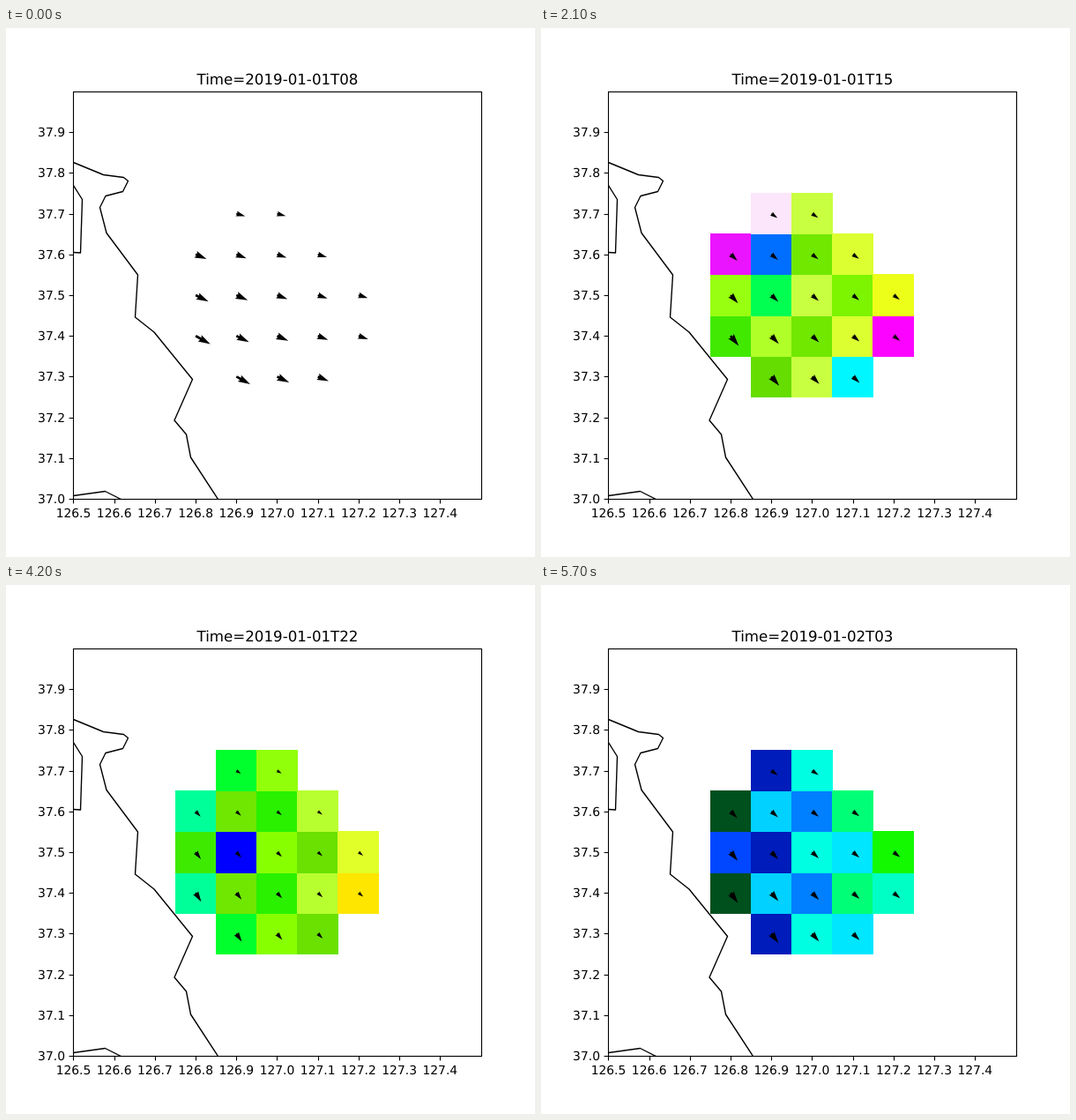
Recreate the animation shown at these times as an HTML page with a canvas. Size 600 px wide and 600 px high, loop 6 s.

```html
<!DOCTYPE html>
<html lang="en">
<head>
<meta charset="utf-8">
<title>Hourly wind map</title>
<style>
  html, body { margin: 0; width: 100%; height: 100%; overflow: hidden; background: #fff; }
  canvas { display: block; width: 100vw; height: 100vh; }
</style>
</head>
<body>
<canvas id="map" width="600" height="600"></canvas>
<script>
const ctx = document.getElementById('map').getContext('2d');
const STEP_MS = 300, STEPS = 20, FIRST_CELL_STEP = 2;
const DEGREE = 462, CELL = DEGREE / 10, LEFT = 76.5, BOTTOM = 534;

const coast = [
  [[76, 152], [110, 166], [133, 169], [138, 173], [132, 185], [112.5, 190], [106, 203], [113.5, 232],
   [149, 279.5], [146, 327.5], [167.5, 344.5], [211, 398], [190.5, 444.5], [204, 460.5], [209, 486.5], [240, 534]],
  [[76, 178], [86, 194], [84, 254.5], [76, 254]],
  [[76, 530], [112, 525], [130, 534]]
];

// First and last occupied column of each row, north to south; drawn from the south
const rowSpans = [[1, 2], [0, 3], [0, 4], [0, 4], [1, 3]];
const cells = rowSpans.flatMap(([from, to], row) =>
  Array.from({ length: to - from + 1 }, (_, i) => ({ row, col: from + i })))
  .sort((a, b) => b.row - a.row || a.col - b.col);

// Evenly spaced colour stops, ten value units apart
const palette = ['008', '060', '00f', '0bf', '0ff', '0f9', '0f0', '6d0', '8f0', 'cf4',
                 'ff0', 'fd0', 'fb1', 'f91', 'f40', 'f00', 'f0f', 'a5f', 'e8e', 'fff']
  .map(hex => [...hex].map(digit => parseInt(digit, 16) * 17));

// Places that stand out from the general level for a while
const spots = [
  { col: 1, row: 0, peak: 7.5, spread: 4.8, amount: 118 },
  { col: 1, row: 1, peak: 7.5, spread: 5, amount: -60 },
  { col: 4, row: 3, peak: 8, spread: 6, amount: 80 },
  { col: 0, row: 1, peak: 7.5, spread: 3.5, amount: 96 },
  { col: 2, row: 0, peak: 11, spread: 2.5, amount: 94 },
  { col: 2, row: 3, peak: 11, spread: 2, amount: 100 },
  { col: 1, row: 2, peak: 11, spread: 4, amount: -41 },
  { col: 3, row: 4, peak: 6, spread: 4, amount: -38 }
];

const snap = v => Math.round(v - 0.01) + 0.5;
const lonX = lon => LEFT + (lon - 126.5) * DEGREE;
const latY = lat => BOTTOM - (lat - 37) * DEGREE;
const wave = (step, peak, period) => Math.cos(2 * Math.PI * (step - peak) / period);

// Rises until step 9, then falls; a growing slope to the east and a checkered ripple
function cellValue({ row, col }, step) {
  const level = 82 - 0.51 * (step - 9) ** 2;
  const slope = 0.5 * step * (col - 1.6);
  const ripple = (row + col) % 2 ? -8 : 8;
  const extra = spots
    .filter(s => s.row === row && s.col === col)
    .reduce((sum, s) => sum + s.amount * Math.exp(-(((step - s.peak) / s.spread) ** 8)), 0);
  return Math.max(0, Math.min(190, level + slope + ripple + extra));
}

function colour(value) {
  const i = Math.min(Math.floor(value / 10), palette.length - 2);
  const t = value / 10 - i;
  return `rgb(${palette[i].map((v, k) => Math.round(v + (palette[i + 1][k] - v) * t))})`;
}

function polyline(points) {
  ctx.beginPath();
  points.forEach(([x, y]) => ctx.lineTo(x, y));
}

function text(string, x, y, size, align) {
  ctx.font = `${size}px "DejaVu Sans", sans-serif`;
  ctx.textAlign = align;
  ctx.textRendering = 'geometricPrecision';
  ctx.fillText(string, x, y);
}

// Cells grow outwards to whole pixels
function drawCells(step) {
  for (const cell of cells) {
    const x = lonX(126.75) + cell.col * CELL, y = latY(37.75) + cell.row * CELL;
    const left = Math.floor(x + 0.01), top = Math.floor(y + 0.01);
    ctx.fillStyle = colour(cellValue(cell, step));
    ctx.fillRect(left, top, Math.ceil(x + CELL - 0.01) - left, Math.ceil(y + CELL - 0.01) - top);
  }
}

function drawArrow(x, y, dx, dy) {
  const length = Math.hypot(dx, dy);
  const w = Math.min(2.77, length / 5);
  const neck = length - 4.5 * w, barb = length - 5 * w;
  ctx.save();
  ctx.translate(x, y);
  ctx.rotate(Math.atan2(dy, dx));
  polyline([[0, -w / 2], [neck, -w / 2], [barb, -1.5 * w], [length, 0],
            [barb, 1.5 * w], [neck, w / 2], [0, w / 2]]);
  ctx.fill();
  ctx.restore();
}

// Wind is strongest in the south-west and turns with the hour
function drawWind(step) {
  const baseX = 7.1 + 2.2 * wave(step, 0, 25);
  const baseY = 3.3 + 1.4 * wave(step, 5, 13);
  const gainX = 0.12 + 0.88 * Math.exp(-step / 5);
  for (const { row, col } of cells) {
    const strength = 2.1 * (row + 0.5) * 0.68 ** col;
    drawArrow(lonX(126.8 + col / 10), latY(37.7 - row / 10),
      baseX + gainX * strength, baseY + 0.97 * strength);
  }
}

function drawCoast() {
  ctx.save();
  ctx.beginPath();
  ctx.rect(LEFT, 72, DEGREE, DEGREE);
  ctx.clip();
  ctx.translate(0.5, 0.5);
  ctx.lineWidth = 1.39;
  ctx.lineJoin = 'round';
  for (const line of coast) {
    polyline(line);
    ctx.stroke();
  }
  ctx.restore();
}

function drawAxes() {
  ctx.lineWidth = 1.11;
  ctx.strokeRect(76.5, 72.5, 463, 462);
  for (let i = 0; i < 10; i++) {
    const lon = 126.5 + i / 10, lat = 37 + i / 10;
    const x = lonX(lon), y = latY(lat);
    polyline([[snap(x), 534.5], [snap(x), 539.4]]);
    ctx.stroke();
    polyline([[76.5, snap(y)], [71.6, snap(y)]]);
    ctx.stroke();
    text(lon.toFixed(1), x, 555, 13.89, 'center');
    text(lat.toFixed(1), 67, Math.round(y) + 5, 13.89, 'right');
  }
}

function draw(step) {
  ctx.fillStyle = '#fff';
  ctx.fillRect(0, 0, 600, 600);
  if (step >= FIRST_CELL_STEP) drawCells(step);
  ctx.fillStyle = ctx.strokeStyle = '#000';
  drawCoast();
  drawWind(step);
  drawAxes();
  const time = new Date(Date.UTC(2019, 0, 1, 8 + step)).toISOString().slice(0, 13);
  text(`Time=${time}`, 308, 64, 16.67, 'center');
}

let shown = -1;
function tick() {
  const step = Math.floor(performance.now() / STEP_MS) % STEPS;
  if (step !== shown) draw(shown = step);
  requestAnimationFrame(tick);
}
tick();
</script>
</body>
</html>
```
